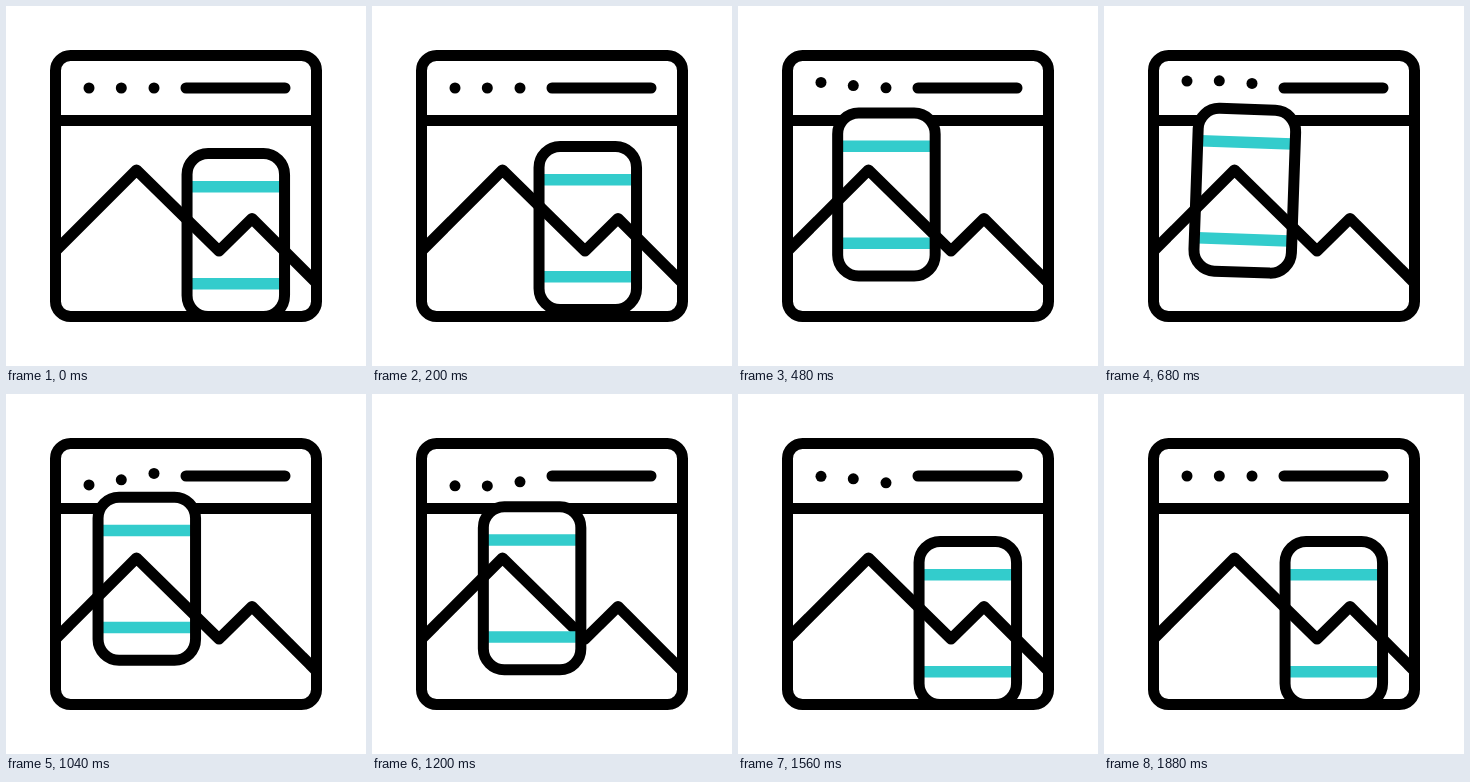
An HTML page that plays this animation: 360 by 360 pixels, repeating every 1920 ms.

```html
<!DOCTYPE html>
<html lang="en">
<head>
<meta charset="utf-8">
<title>Responsive page</title>
<style>
  html, body { margin: 0; width: 100%; height: 100%; overflow: hidden; background: #fff; }
  svg { display: block; width: 100%; height: 100%; }
  .line { fill: none; stroke: #000; stroke-width: 11; stroke-linecap: round; stroke-linejoin: round; }
  .band { stroke: #3cc; stroke-width: 11.5; }
</style>
</head>
<body>
<svg viewBox="0 0 360 360">
  <rect class="line" x="49.5" y="49.5" width="261" height="261" rx="15"/>
  <path class="line" d="M50 114.5H310M180 82H279"/>
  <circle class="dot" cx="83" cy="82" r="5.5"/>
  <circle class="dot" cx="115.3" cy="82" r="5.5"/>
  <circle class="dot" cx="148" cy="82" r="5.5"/>
  <g class="phone"><rect x="-48.5" y="-81.5" width="97" height="163" rx="21" fill="#fff"/></g>
  <path class="line" d="M50 244.5L130.5 164L213 245L246 212.5L310 276.5"/>
  <g class="phone">
    <path class="band" d="M-46 -48.3H46M-46 48.7H46"/>
    <rect class="line" x="-48.75" y="-81.5" width="97.5" height="163" rx="21"/>
  </g>
</svg>
<script>
const LOOP = 1920, STEP = 40, DOT_DELAY = 120;
const dots = document.querySelectorAll('.dot');
const phones = document.querySelectorAll('.phone');

// Progress from 0 to 1 between two times, clamped.
const span = (t, from, to) => Math.min(1, Math.max(0, (t - from) / (to - from)));
const ease = (t, from, to) => (1 - Math.cos(Math.PI * span(t, from, to))) / 2;

// Each dot rises, dips below its rest line and settles.
const dotY = t => 82 - 7.5 * ease(t, 200, 620) + 17.8 * ease(t, 620, 1130) - 10.3 * ease(t, 1130, 1610);

function draw(now) {
  const t = Math.floor(now % LOOP / STEP) * STEP;
  const slide = ease(t, 68, 576) - ease(t, 1044, 1550);
  const tilt = 2.2 * Math.sin(2 * Math.PI * span(t, 600, 1040));
  const pose = `translate(${229.8 - 89 * slide} ${229 - 44.3 * slide}) rotate(${tilt})`;
  phones.forEach(p => p.setAttribute('transform', pose));
  dots.forEach((d, i) => d.setAttribute('cy', dotY(t - i * DOT_DELAY)));
}

const start = performance.now();
function tick() {
  draw(performance.now() - start);
  requestAnimationFrame(tick);
}
tick();
</script>
</body>
</html>
```
